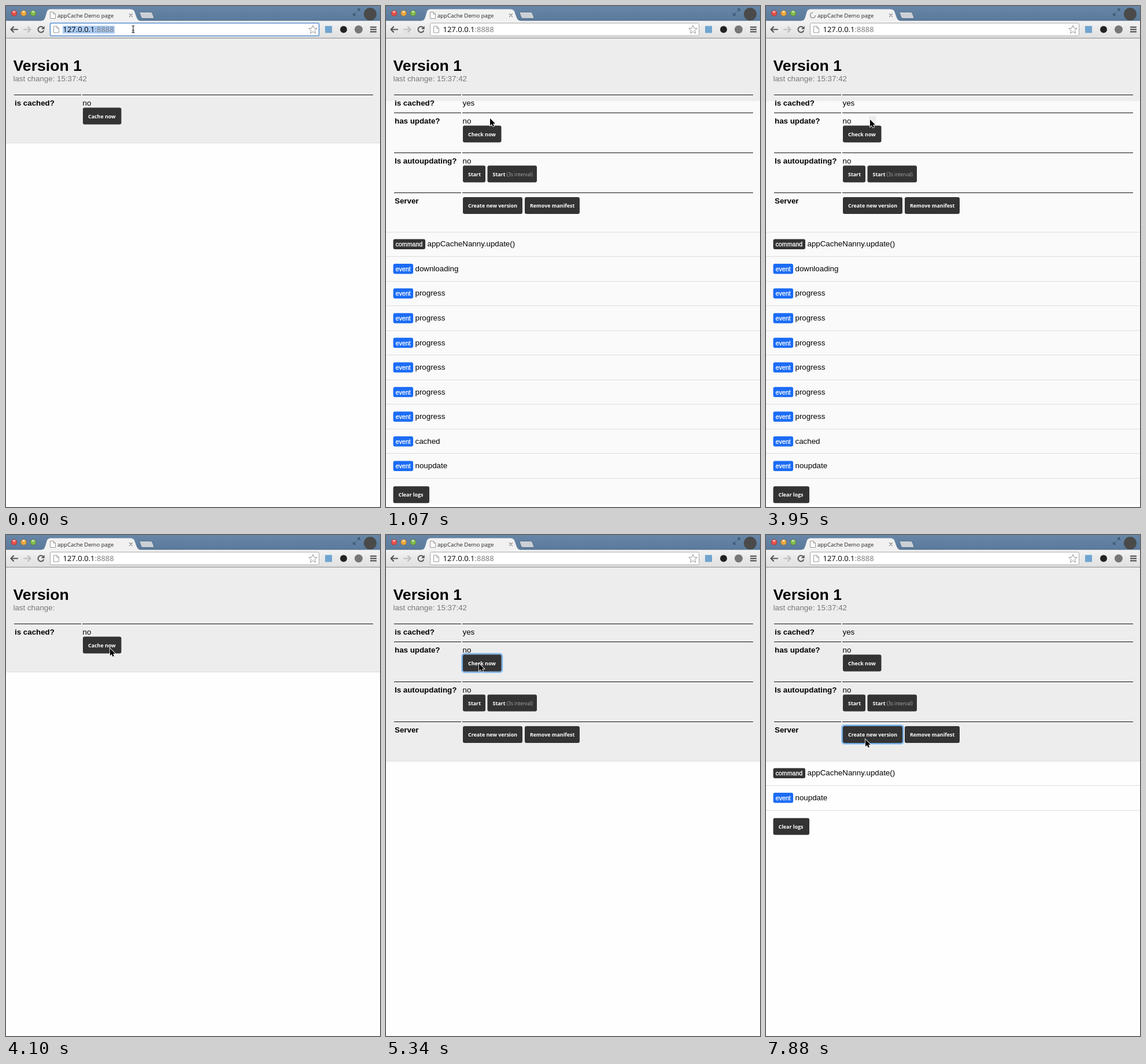
Recreate the animation shown at these times as an HTML page. Size 647 by 865 pixels, loop 8 s.

```html
<!DOCTYPE html>
<html lang="en">
<head>
<meta charset="utf-8">
<title>appCache Demo page</title>
<style>
  html, body { margin: 0; width: 100%; height: 100%; overflow: hidden; background: #fefefe; }
  svg { display: block; width: 647px; height: 865px; font: 13.33px "Liberation Sans", Arial, sans-serif; }
  .ui { font-family: "Open Sans", "Noto Sans", sans-serif; }
  .btn { font: bold 8.9px "Open Sans", "Noto Sans", sans-serif; fill: #fff; }
  .btn .note { font-weight: 400; font-size: 8.3px; fill: #aaa; }
  .badge { font-size: 10.67px; fill: #fff; stroke: #fff; stroke-width: .3; }
  .line { fill: none; stroke-linecap: round; stroke-linejoin: round; }
  b, .bold { font-weight: bold; }
</style>
</head>
<body>
<svg viewBox="0 0 647 865">
  <defs>
    <linearGradient id="title" x2="0" y2="1"><stop stop-color="#6887a8"/><stop offset="1" stop-color="#5a7a9b"/></linearGradient>
    <linearGradient id="bar" x2="0" y2="1"><stop stop-color="#f3f3f3"/><stop offset="1" stop-color="#e0e0e0"/></linearGradient>
    <g id="sheet"><path d="M.5 .5H6L9.5 4V11.5H.5ZM6 .5V4H9.5" fill="#fff" stroke="#999"/></g>
    <path id="arrow" d="M0 0V12.4L2.8 9.8 4.8 14 7 13.1 5.1 8.9H9Z"/>
  </defs>

  <g id="page"></g>

  <rect width="647" height="25" fill="url(#title)"/>
  <rect y="25" width="647" height="30" fill="url(#bar)"/>
  <path d="M0 55.5H647" stroke="#8a8a8a"/>
  <path d="M0 25H62" stroke="#4d6985"/>
  <path d="M231 25H647" stroke="#4d6985"/>
  <path d="M62 25.5C66 25 67 22 68 19L71 9Q73 5.5 77 5.5H215Q220 5.5 222 9L226 20Q228 25 232 25.5Z" fill="#f1f1f1"/>
  <path d="M232 10.5H250Q252 10.5 253 12L256 20Q256 21.5 254 21.5H237Q235 21.5 234 20L231 12Q231 10.5 232 10.5Z" fill="#cbd0d5" stroke="#556f8a"/>
  <g stroke-width=".8">
    <circle cx="14" cy="12.5" r="4.8" fill="#e5514a" stroke="#9b3734"/>
    <circle cx="30.5" cy="12.5" r="4.8" fill="#efaa3c" stroke="#9c7130"/>
    <circle cx="47" cy="12.5" r="4.8" fill="#82bd4d" stroke="#527b36"/>
  </g>
  <g fill="#fff" opacity=".6">
    <ellipse cx="14" cy="10" rx="2.6" ry="1.4"/><ellipse cx="30.5" cy="10" rx="2.6" ry="1.4"/><ellipse cx="47" cy="10" rx="2.6" ry="1.4"/>
  </g>
  <g id="favicon"></g>
  <text class="ui" x="89" y="20" font-size="9.5" fill="#222">appCache Demo page</text>
  <path class="line" d="M213.5 13.5L218.5 18.5M218.5 13.5L213.5 18.5" stroke="#888" stroke-width="1.2"/>
  <path class="line" d="M608 9L612 5M608.5 5H612V8.5M605 12L601 16M601 12.5V16H604.5" stroke="#3b556f" stroke-width="1.3"/>
  <circle cx="630" cy="14" r="11" fill="#4a4a4a"/>

  <path class="line" d="M20 40.5H8.5M13 36L8.5 40.5 13 45" stroke="#555" stroke-width="2.2"/>
  <path class="line" d="M31 40.5H42.5M38 36L42.5 40.5 38 45" stroke="#bdbdbd" stroke-width="2.2"/>
  <path d="M64.6 37.7A5 5 0 1 0 65.3 42" fill="none" stroke="#555" stroke-width="2"/>
  <path d="M66.6 34.5V40H61Z" fill="#555"/>
  <g id="address"></g>
  <path d="M531 33.5L533 38.3 538.2 38.7 534.2 42 535.5 47.2 531 44.4 526.5 47.2 527.8 42 523.8 38.7 529 38.3Z" fill="#fff" stroke="#999"/>
  <rect x="552" y="34.5" width="12" height="12" fill="#6fa5d0"/>
  <circle cx="584" cy="40.5" r="6" fill="#222"/>
  <circle cx="610" cy="40.5" r="7" fill="#777"/>
  <path d="M630 36.5H641M630 40.5H641M630 44.5H641" stroke="#444" stroke-width="2.2"/>
  <g id="pointer"></g>
</svg>
<script>
const LOOP = 8000;
const layer = id => document.getElementById(id);

// Pointer stops: [time, x, y]
const stops = [
  [0, 220, 40], [150, 217, 62], [300, 206, 108], [450, 192, 155], [600, 183, 182], [770, 180, 190],
  [1070, 180, 194], [3020, 180, 193], [3200, 180, 196],
  [4400, 178, 200], [4550, 173, 208], [4720, 167, 215], [4900, 163, 219], [5040, 162, 221], [5190, 161, 222],
  [6690, 161, 229], [6840, 162, 256], [6990, 166, 302], [7130, 170, 340], [7280, 172, 356], [7880, 172, 353]
];

const rect = (x, y, w, h, fill, more = '') =>
  `<rect x="${x}" y="${y}" width="${w}" height="${h}" fill="${fill}" ${more}/>`;
const text = (x, y, s, more = '') => `<text x="${x}" y="${y}" ${more}>${s}</text>`;

function button(x, y, w, label, focused) {
  const ring = focused
    ? rect(x - 2, y - 2, w + 4, 33, 'none', 'rx="4" stroke="#b5d5f5" stroke-width="2"') +
      rect(x - 1, y - 1, w + 2, 31, 'none', 'rx="4" stroke="#71a9e2" stroke-width="2"')
    : '';
  return ring + rect(x, y, w, 29, '#333', 'rx="3"') + text(x + 9, y + 18, label, 'class="btn"');
}

function row(y, label, value = '') {
  return `<path d="M14 ${y + .5}H130M132 ${y + .5}H635" stroke="#111"/>` +
    text(15, y + 19, label, 'class="bold"') + text(132.5, y + 19, value);
}

function log(top, entries) {
  if (!entries.length) return '';
  const pitch = 42.55;
  const lines = entries.map((name, i) => {
    const y = top + i * pitch, command = name.endsWith(')');
    const w = command ? 55.5 : 34.5;
    return rect(12.5, y + 12.5, w, 17.5, command ? '#333' : '#1b6cf5', 'rx="3"') +
      text(16.5, y + 25.3, command ? 'command' : 'event', 'class="badge"') +
      text(w + 16, y + 25.3, name) +
      rect(0, Math.round(y + pitch - .5), 647, 1, '#ddd');
  });
  return lines.join('') + button(12.5, top + entries.length * pitch + 13.7, 62.5, 'Clear logs');
}

function page({ cached, loaded, repaint, focus, entries }) {
  const bottom = cached ? 390 : 236;
  let out = rect(0, 56, 647, bottom - 56, '#ededed');
  if (repaint) out += rect(0, 164, 647, 695, '#fafafa');
  if (repaint === 2) out += rect(178, 190, 12, 20, '#ededed');
  out += rect(0, bottom, 647, 1, '#ddd') +
    text(12.5, 111.5, loaded ? 'Version 1' : 'Version', 'class="bold" font-size="26.67"') +
    text(12.5, 129.5, 'last change:' + (loaded ? ' 15:37:42' : ''), 'fill="#777"') +
    row(153, 'is cached?', cached ? 'yes' : 'no');
  if (cached) {
    out += row(184, 'has update?', 'no') + button(133, 206.5, 66.5, 'Check now', focus === 'check') +
      row(253, 'Is autoupdating?', 'no') + button(133, 275.5, 39, 'Start') +
      button(175.5, 275.5, 85.5, 'Start <tspan class="note">(3s interval)</tspan>') +
      row(322, 'Server') + button(133, 330, 103, 'Create new version', focus === 'create') +
      button(240, 330, 95, 'Remove manifest');
  } else {
    out += button(133, 175.5, 66.5, 'Cache now', focus === 'cache');
  }
  return out + log(bottom, entries);
}

function address(selected) {
  return rect(76.5, 29.5, 465, 22, '#fff', `rx="2" stroke="${selected ? '#78a4d8' : '#aaa'}" stroke-width="${selected ? 2 : 1}"`) +
    '<use href="#sheet" x="82" y="34.5"/>' +
    (selected ? rect(98, 34, 90, 13.5, '#a9caf4') : '') +
    text(98.5, 45, '127.0.0.1<tspan fill="#777">:8888</tspan>', 'class="ui" font-size="13"');
}

function pointer(x, y) {
  if (y < 56) return `<path class="line" d="M${x - 2} ${y - 6}Q${x} ${y - 6} ${x} ${y - 4}V${y + 4}Q${x} ${y + 6} ${x - 2} ${y + 6}M${x + 2} ${y - 6}Q${x} ${y - 6} ${x} ${y - 4}M${x + 2} ${y + 6}Q${x} ${y + 6} ${x} ${y + 4}M${x - 1.5} ${y + 2}H${x + 1.5}" stroke="#222" stroke-width="1.1"/>`;
  return `<g transform="translate(${x} ${y})"><use href="#arrow" y="1" fill="#000" opacity=".2"/>` +
    '<use href="#arrow" fill="#000" stroke="#fff" stroke-width="1.6" paint-order="stroke"/></g>';
}

function entriesAt(t) {
  const update = 'appCacheNanny.update()';
  if (t < 920) return [];
  if (t < 1070) return [update];
  if (t < 4100) return [update, 'downloading', ...Array(6).fill('progress'), 'cached', 'noupdate'];
  return t < 5490 ? [] : [update, 'noupdate'];
}

function focusAt(t) {
  if (t >= 770 && t < 1070) return 'cache';
  if (t >= 7880) return 'create';
  return t >= 5340 ? 'check' : '';
}

function paint(id, markup) {
  const g = layer(id);
  if (g.markup !== markup) g.innerHTML = g.markup = markup;
}

function draw(now) {
  const t = now % LOOP;
  const reloading = t >= 3950 && t < 4100;
  const [, x, y] = stops.findLast(s => s[0] <= t);
  paint('page', page({
    cached: t >= 1070 && t < 4100 || t >= 4250,
    loaded: t < 4100 || t >= 4250,
    repaint: t < 1070 || t >= 4100 ? 0 : t < 3020 ? 1 : 2,
    focus: focusAt(t),
    entries: entriesAt(t)
  }));
  paint('favicon', reloading
    ? '<path d="M81 11.5A4.5 4.5 0 1 0 85.5 16" fill="none" stroke="#999" stroke-width="1.6"/>'
    : '<use href="#sheet" x="76" y="10"/>');
  paint('address', address(t < 770));
  paint('pointer', pointer(x, y));
}

const start = performance.now();
function tick() {
  draw(performance.now() - start);
  requestAnimationFrame(tick);
}
tick();
</script>
</body>
</html>
```
